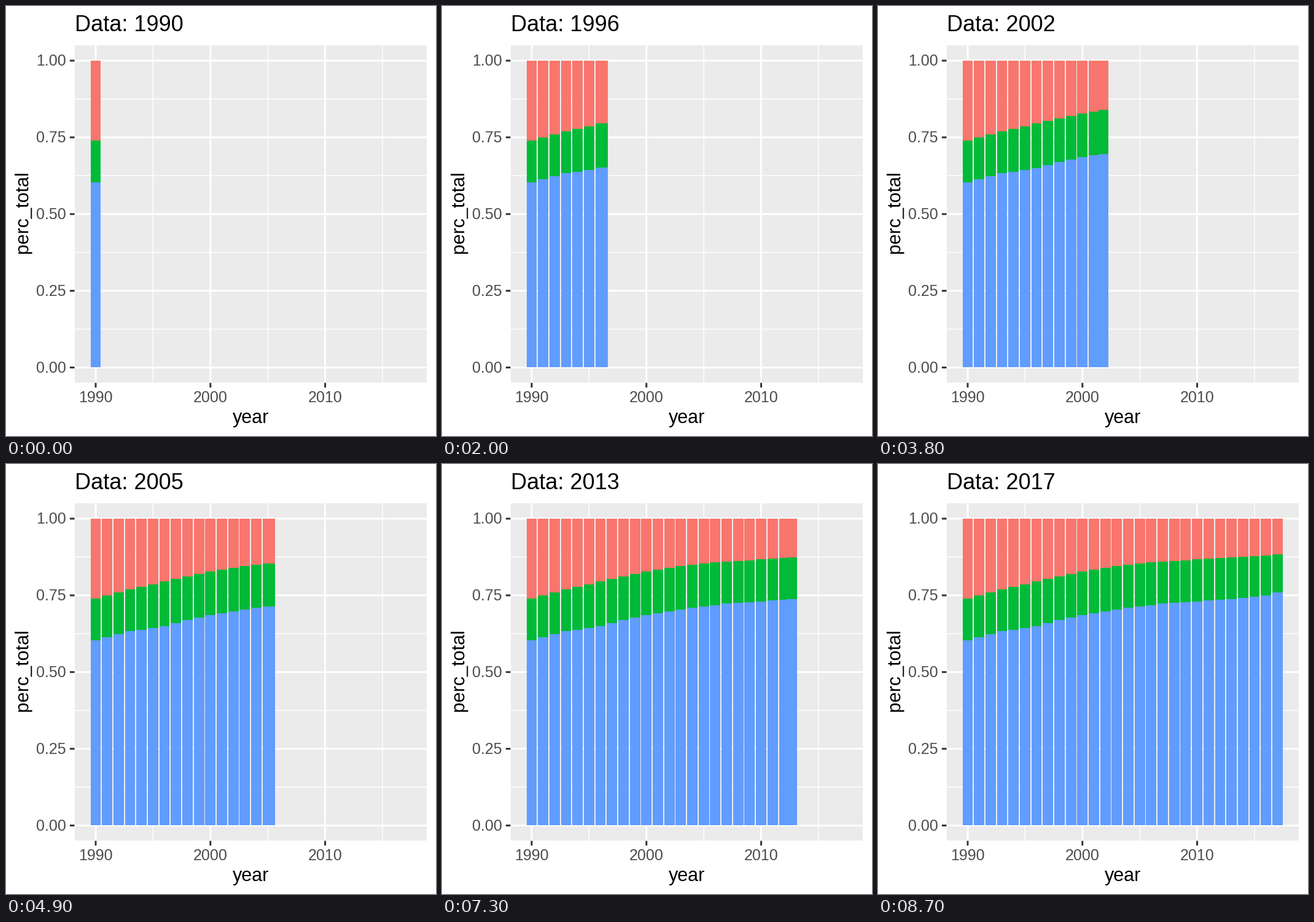
These frames come from a looping animation (700 px wide and 700 px high, 10 s). A matplotlib script:

```python
import numpy as np
import matplotlib.pyplot as plt
from matplotlib.animation import FuncAnimation
from matplotlib.patches import PathPatch, Rectangle
from matplotlib.textpath import TextPath
from matplotlib.transforms import Affine2D

plt.rcParams["font.family"] = "Liberation Sans"
plt.rcParams["text.hinting"] = "force_autohint"

SIZE, DPI = 700, 200
STEP_MS, FRAMES, LAST = 50, 200, 174
FIRST_YEAR, SPAN = 1990, 27
LEFT, RIGHT, TOP, BOTTOM = 111.53, 684.78, 64.0, 613.47
TICK, LABEL_GAP = 7.61, 13.7
RED, GREEN, BLUE = "#F8766D", "#00BA38", "#619CFF"
SMALL, MEDIUM, LARGE = 9, 11, 13

years = np.arange(SPAN + 1)
key_frames = np.round(years * LAST / SPAN)


def trend(*knots):
    """Share per year, straight between (year, share) knots."""
    return np.interp(years, *zip(*knots))


blue_top = trend((0, .603), (3, .633), (6, .649), (8, .670), (10, .685),
                 (14, .709), (17, .723), (23, .738), (26, .749), (27, .759))
green_top = trend((0, .740), (3, .770), (10, .828), (13, .846), (16, .858),
                  (19, .864), (20, .868), (26, .880), (27, .884))

unit_x = (RIGHT - LEFT) / (1.1 * (SPAN + 0.9))
unit_y = (BOTTOM - TOP) / 1.1
x_origin = LEFT + (0.45 + 0.05 * (SPAN + 0.9)) * unit_x
y_origin = BOTTOM - 0.05 * unit_y


def px(year):
    return x_origin + year * unit_x


def py(share):
    return y_origin - share * unit_y


def whole(v):
    return np.floor(v + 0.5)


fig = plt.figure(figsize=(SIZE / DPI, SIZE / DPI), dpi=DPI, facecolor="white")
ax = fig.add_axes([0, 0, 1, 1])
ax.set_xlim(0, SIZE)
ax.set_ylim(SIZE, 0)
ax.axis("off")


def add_rect(color, z):
    return ax.add_patch(Rectangle((0, 0), 0, 0, fc=color, lw=0, ec="none",
                                  antialiased=False, snap=False, zorder=z))


def place(rect, x0, x1, y0, y1):
    x0, x1, y0, y1 = (whole(v) for v in (x0, x1, y0, y1))
    rect.set_bounds(x0, y0, x1 - x0, y1 - y0)


def line(xs, ys, color, width, z):
    ax.plot(xs, ys, color=color, lw=width * 72 / DPI, snap=False,
            solid_capstyle="butt", zorder=z)


def label(x, y, text, size, color="black"):
    return ax.text(x, y, text, fontsize=size, color=color,
                   ha="left", va="baseline", zorder=6)


def upright_label(x, y, text, size):
    """Text running upwards from (x, y), with x as its baseline."""
    turn = Affine2D([[0, -1, x], [-1, 0, y], [0, 0, 1]])
    outline = TextPath((0, 0), text, size=size * DPI / 72)
    ax.add_patch(PathPatch(turn.transform_path(outline), fc="black", lw=0,
                           ec="none", snap=False, zorder=6))


def grid(xs, ys, width, z):
    for x in xs:
        line([px(x)] * 2, [whole(TOP), whole(BOTTOM)], "white", width, z)
    for y in ys:
        line([whole(LEFT), whole(RIGHT)], [py(y)] * 2, "white", width, z)


place(add_rect("#EBEBEB", 0), LEFT, RIGHT, TOP, BOTTOM)
x_major, y_major = (0, 10, 20), np.linspace(0, 1, 5)
grid((5, 15, 25), y_major[:-1] + 0.125, 1.48, 1)
grid(x_major, y_major, 2.96, 2)

for x in x_major:
    line([px(x)] * 2, [BOTTOM, BOTTOM + TICK], "#333333", 2.96, 5)
    label(px(x) - 28, 644.6, str(FIRST_YEAR + x), SMALL, "#4D4D4D")
for y in y_major:
    line([LEFT - TICK, LEFT], [py(y)] * 2, "#333333", 2.96, 5)
    label(LEFT - LABEL_GAP - 49, py(y) + 8.5, f"{y:.2f}", SMALL, "#4D4D4D")

label((LEFT + RIGHT) / 2 - 29.5, 678.8, "year", MEDIUM)
upright_label(36.2, (TOP + BOTTOM) / 2 + 66.7, "perc_total", MEDIUM)
title = label(LEFT, 41, "", LARGE)


def make_bar(z):
    return [add_rect(c, z) for c in (BLUE, GREEN, RED)]


def set_bar(bar, year):
    edges = (0, np.interp(year, years, blue_top),
             np.interp(year, years, green_top), 1)
    for rect, low, high in zip(bar, edges, edges[1:]):
        place(rect, px(year - 0.45), px(year + 0.45), py(high), py(low))


past = [make_bar(3) for _ in years]
for year, bar in zip(years, past):
    set_bar(bar, year)
mover = make_bar(4)


def draw(i):
    i = min(i, LAST)
    set_bar(mover, np.interp(i, key_frames, years))
    for key, bar in zip(key_frames, past):
        for rect in bar:
            rect.set_visible(key < i)
    title.set_text(f"Data: {round(FIRST_YEAR + i * SPAN / LAST)}")
    return []


anim = FuncAnimation(fig, draw, frames=FRAMES, interval=STEP_MS,
                     repeat=True, repeat_delay=0, blit=False)
plt.show()
```
